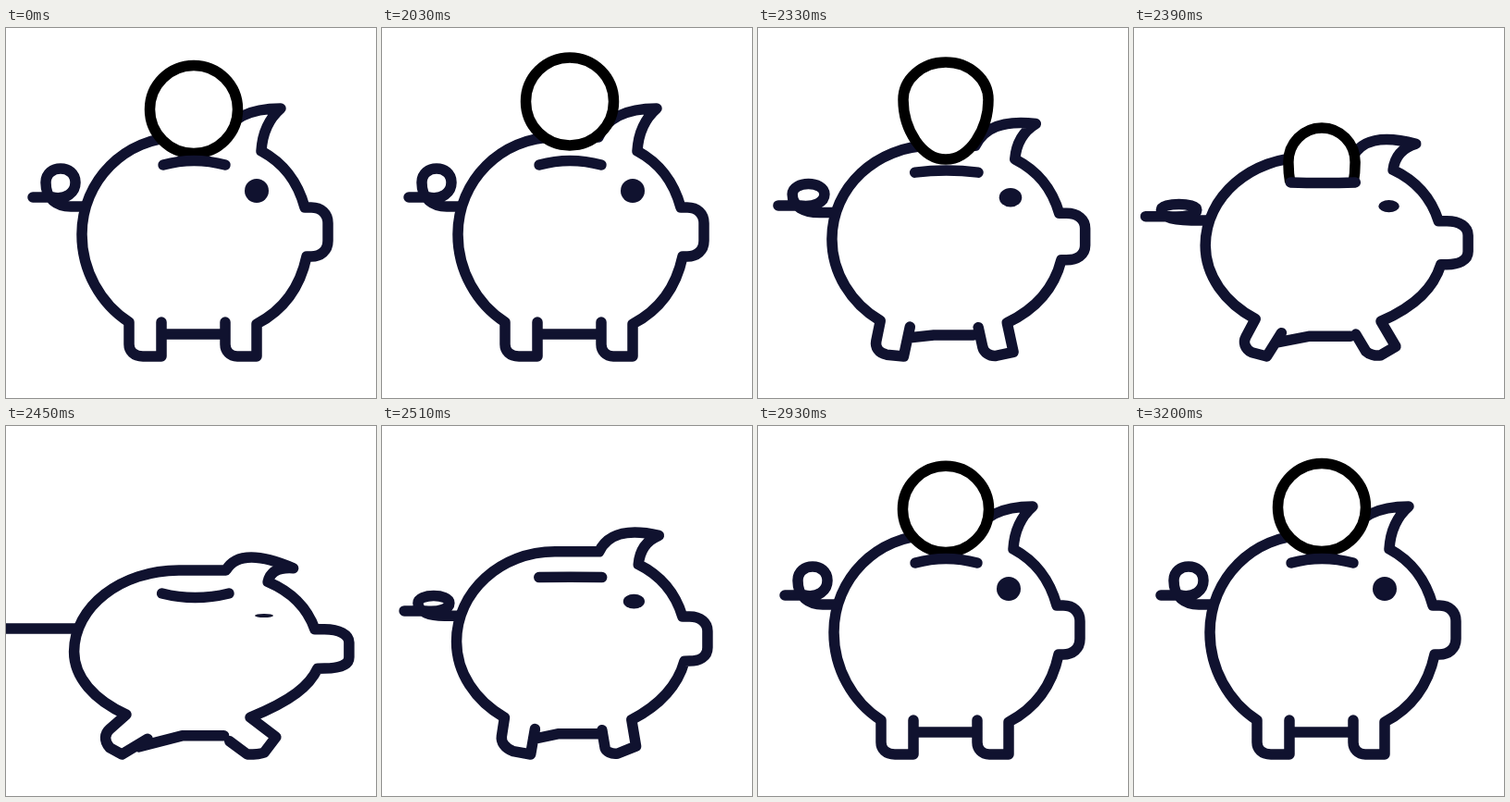
Write an HTML page with a canvas that moves like this. It is 400 px wide and 400 px high and loops after 3230 ms.

```html
<!DOCTYPE html>
<html lang="en">
<head>
<meta charset="utf-8">
<title>Piggy bank</title>
<style>
  html, body { margin: 0; width: 100%; height: 100%; overflow: hidden; background: #fff; }
  canvas { display: block; }
</style>
</head>
<body>
<canvas id="stage" width="400" height="400"></canvas>
<script>
const ctx = document.getElementById('stage').getContext('2d');
const LOOP = 3230, HOLD = 2030, STEP = 30;
const NAVY = '#10122f', BLACK = '#000';
const { min, max, cos, sin, exp, PI } = Math;
const clamp = u => min(1, max(0, u));

const PIG = `M133 318 C102 298 82 262 82 223 C82 165 129 118 187 118 L234 118
  C243 98 262 87 297 87 C282 100 277 116 276 133 C300 146 315 165 323 194
  L330 194 C341 194 348 201 348 211 L348 230 C348 241 340 247 330 247 L325 247
  C318 280 300 305 271 320 L271 355 L250 355 C242 355 237 349 237 342 L237 318
  M133 318 L133 342 C133 349 138 355 148 355 L168 355 L168 318
  M168 331 L190 331 L232 331`;
const TAIL = `M29 183 L50 183 C65 186 75 178 75 167 C75 147 43 147 43 167
  C43 185 55 193 70 193 L85 193`;
const SLOT = 'M170 148 Q203 139 237 148';

// Warps send a resting point to its place in the fully squashed pose.
const widen = x => x + .08 * (x - 187);
const flatten = y => y + .16 * (355 - y);

function splay(u, v, hipX, hipY, angle) {
  return [hipX + u * cos(angle) - v * sin(angle),
          min(355, hipY + u * sin(angle) + v * cos(angle))];
}

function squashPig(x, y) {
  if (y > 310) {
    if (x <= 170) return splay(x - 133, y - 318, 130, 312, .85);
    if (x >= 235) return splay(x - 271, y - 320, 264, 315, -.92);
    return [widen(x), flatten(y)];
  }
  const earFlop = .011 * max(0, x - 250) * max(0, 133 - y);
  const snout = .4 * max(0, x - 323);
  const pinch = .0022 * max(0, y - 240) * Math.abs(x - 187);
  return [widen(x) + .2 * earFlop + snout, flatten(y) + earFlop - pinch];
}
const squashTail = x => [76 + 1.35 * (x - 85), 219];
const squashSlot = (x, y) => [widen(x), 329 - y];

function strokeWarped(path, warp, squash) {
  ctx.stroke(new Path2D(path.replace(/(\d+) (\d+)/g, (_, a, b) => {
    const x = +a, y = +b, [wx, wy] = warp(x, y);
    return `${x + (wx - x) * squash.x} ${y + (wy - y) * squash.y}`;
  })));
}

// Accelerates into the squash, then springs back sideways and eases upright.
function squashAt(time) {
  if (time < 2450) {
    const s = clamp((time - 2240) / 210) ** 1.65;
    return { x: s, y: s };
  }
  const s = (time - 2450) / 90;
  return { x: cos(s * PI / 2) * exp(-1.6 * s), y: max(0, 1 - s / 3) ** 3 };
}

// Jumps, drops stretched through the slot, then pops back out and settles.
function coinAt(time) {
  if (time < 2010) return { y: 88, w: 47.5, h: 47.5, egg: 0 };
  if (time < 2450) {
    const egg = max(0, (time - 2210) / 120);
    const y = time < 2150
      ? 55.5 + 32.5 * ((2150 - time) / 140) ** 2
      : 55.5 + 34 * ((time - 2150) / 180) ** 4;
    return { y, w: 47.5 - 1.5 * egg ** 5, h: 47.5 + 5 * egg, egg };
  }
  if (time < 2740) return null;
  const r = 47.5 * (.6 + .4 * clamp((time - 2740) / 200));
  const y = time < 3010
    ? 67.5 + 147.5 * ((3010 - time) / 270) ** 1.55
    : 88 - 20.5 * (1 - clamp((time - 3010) / 190)) ** 2;
  return { y, w: r, h: r, egg: 0 };
}

function drawCoin({ y, w, h, egg }, slotY) {
  const x = 203, top = y - h, bottom = y + h, mid = y - 12 * egg;
  const k = .552, rise = k * (mid - top), fall = (k - .05 * egg) * (bottom - mid);
  ctx.save();
  ctx.beginPath();
  ctx.rect(0, 0, 400, slotY);
  ctx.clip();
  ctx.beginPath();
  ctx.moveTo(x, top);
  ctx.bezierCurveTo(x + k * w, top, x + w, mid - rise, x + w, mid);
  ctx.bezierCurveTo(x + w, mid + fall, x + k * w, bottom, x, bottom);
  ctx.bezierCurveTo(x - k * w, bottom, x - w, mid + fall, x - w, mid);
  ctx.bezierCurveTo(x - w, mid - rise, x - k * w, top, x, top);
  ctx.closePath();
  ctx.fillStyle = '#fff';
  ctx.fill();
  ctx.strokeStyle = BLACK;
  ctx.stroke();
  ctx.restore();
}

function draw(time) {
  const squash = squashAt(time), coin = coinAt(time);
  ctx.clearRect(0, 0, 400, 400);
  ctx.lineWidth = 11.5;
  ctx.lineCap = ctx.lineJoin = 'round';
  ctx.strokeStyle = ctx.fillStyle = NAVY;
  strokeWarped(PIG, squashPig, squash);
  strokeWarped(TAIL, squashTail, squash);

  ctx.beginPath();
  ctx.ellipse(271 + 8 * squash.x, 176 + 29 * squash.y,
    13 - 3 * squash.y, 13 - 11 * squash.y, 0, 0, 2 * PI);
  ctx.fill();

  if (coin) drawCoin(coin, 144 + 41 * squash.y);
  strokeWarped(SLOT, squashSlot, squash);
}

const start = performance.now();
function tick() {
  const time = (performance.now() - start) % LOOP;
  draw(time < HOLD ? 0 : HOLD + Math.floor((time - HOLD) / STEP) * STEP);
  requestAnimationFrame(tick);
}
tick();
</script>
</body>
</html>
```
